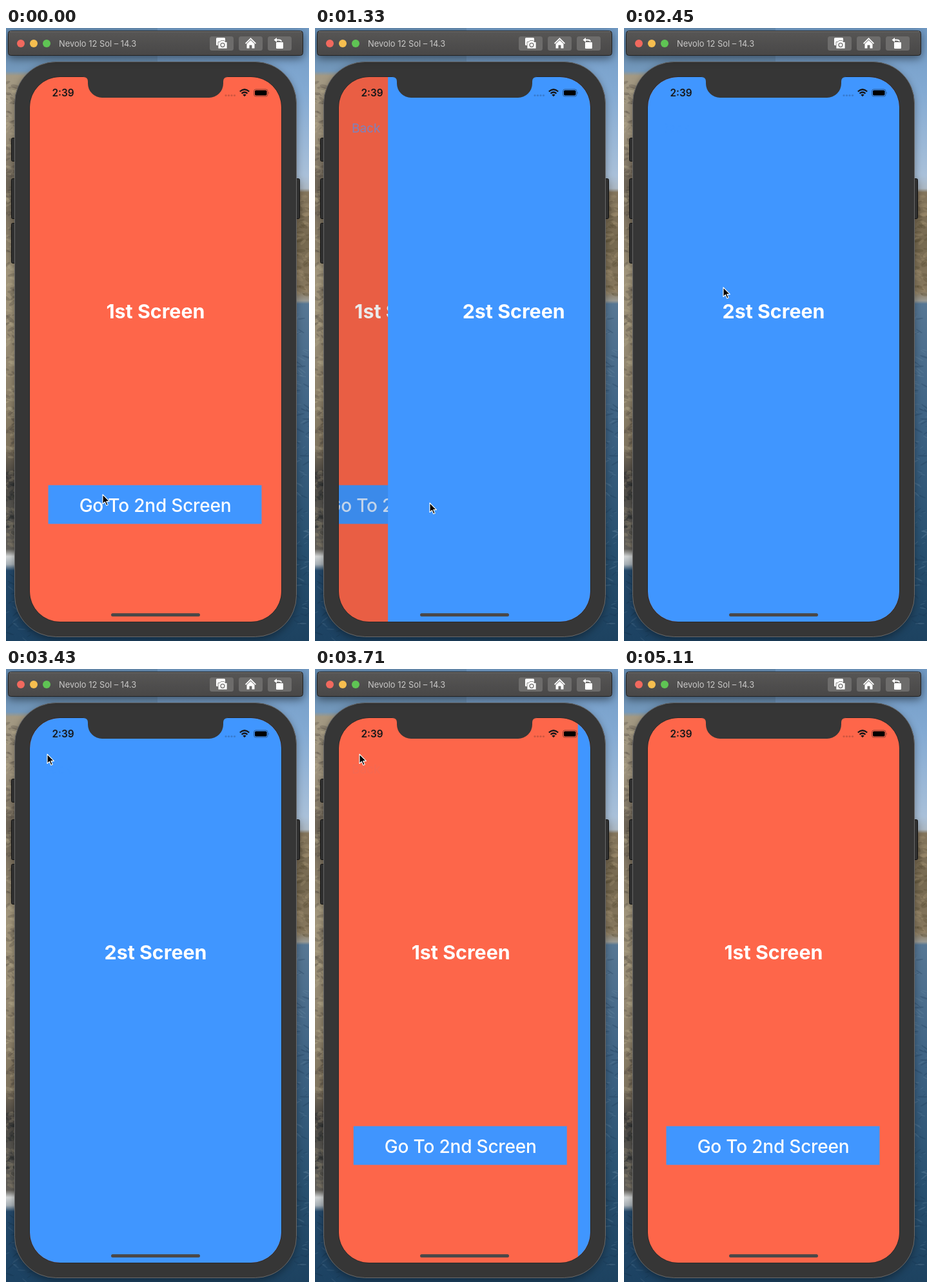
Recreate the animation shown at these times as an HTML page. Size 470 px wide and 950 px high, loop 5.18 s.

```html
<!DOCTYPE html>
<html lang="en">
<head>
<meta charset="utf-8">
<title>Screen navigation</title>
<style>
  html, body { margin: 0; width: 100%; height: 100%; overflow: hidden; background: #1d4260; }
  svg { display: block; width: 100%; height: 100%; }
  text { font-family: Inter, Roboto, sans-serif; font-optical-sizing: none; }
  .heading { font-size: 30.4px; font-weight: 700; fill: #fff; text-anchor: middle; }
  .link { font-size: 28px; font-weight: 450; letter-spacing: -.2px; fill: #fff; text-anchor: middle; }
  .device { filter: drop-shadow(0 4px 6px rgba(0, 0, 0, .35)); }
  .bar { filter: drop-shadow(0 4px 7px rgba(0, 0, 0, .5)); }
</style>
</head>
<body>
<svg viewBox="0 0 470 950" preserveAspectRatio="none">
  <defs>
    <linearGradient id="leftTone" x2="0" y2="1">
      <stop offset="0" stop-color="#688fb5"/>
      <stop offset=".07" stop-color="#7398bb"/>
      <stop offset=".078" stop-color="#a39983"/>
      <stop offset=".2" stop-color="#9c907a"/>
      <stop offset=".25" stop-color="#71685a"/>
      <stop offset=".33" stop-color="#8a7e69"/>
      <stop offset=".4" stop-color="#a2967c"/>
      <stop offset=".55" stop-color="#958971"/>
      <stop offset=".68" stop-color="#81755f"/>
      <stop offset=".73" stop-color="#4c4843"/>
      <stop offset=".78" stop-color="#55534e"/>
      <stop offset=".85" stop-color="#625f59"/>
      <stop offset=".862" stop-color="#d3d6d6"/>
      <stop offset=".875" stop-color="#a9b2b8"/>
      <stop offset=".885" stop-color="#24496a"/>
      <stop offset="1" stop-color="#1c4262"/>
    </linearGradient>
    <linearGradient id="rightTone" x2="0" y2="1">
      <stop offset="0" stop-color="#719ac4"/>
      <stop offset=".1" stop-color="#82a9d2"/>
      <stop offset=".24" stop-color="#a9c0d9"/>
      <stop offset=".262" stop-color="#adb9c4"/>
      <stop offset=".268" stop-color="#85765d"/>
      <stop offset=".35" stop-color="#766950"/>
      <stop offset=".43" stop-color="#88795f"/>
      <stop offset=".445" stop-color="#9a9a93"/>
      <stop offset=".45" stop-color="#577794"/>
      <stop offset=".65" stop-color="#3d6283"/>
      <stop offset=".85" stop-color="#28506f"/>
      <stop offset="1" stop-color="#1d4260"/>
    </linearGradient>
    <linearGradient id="barTone" x2="0" y2="1">
      <stop offset="0" stop-color="#575655"/>
      <stop offset="1" stop-color="#484747"/>
    </linearGradient>
    <clipPath id="display"><rect x="37" y="76" width="390" height="844" rx="47"/></clipPath>
  </defs>

  <rect width="235" height="950" fill="url(#leftTone)"/>
  <rect x="235" width="235" height="950" fill="url(#rightTone)"/>
  <g id="texture"></g>

  <g class="device">
    <g fill="#303030" stroke="#111">
      <rect x="8.5" y="170.5" width="9" height="36" rx="2"/>
      <rect x="8.5" y="233.5" width="9" height="62" rx="2"/>
      <rect x="8.5" y="302.5" width="9" height="62" rx="2"/>
      <rect x="446.5" y="233.5" width="9" height="62" rx="2"/>
    </g>
    <rect x="13.5" y="52.5" width="437" height="891" rx="64" fill="#363636" stroke="#686868"/>
  </g>

  <g clip-path="url(#display)">
    <rect x="37" y="76" width="390" height="844" fill="#fe664a"/>
    <g id="first">
      <rect x="37" y="76" width="390" height="844" fill="#fe664a"/>
      <text class="heading" x="232" y="450">1st Screen</text>
      <rect x="65.5" y="708.5" width="331" height="60" fill="#4096ff"/>
      <text id="link" class="link" x="231.5" y="750">Go To 2nd Screen</text>
      <rect id="dim" x="37" y="76" width="390" height="844" fill="#000"/>
    </g>
    <g id="second">
      <rect x="37" y="76" width="390" height="844" fill="#4096ff"/>
      <text class="heading" x="232" y="450">2st Screen</text>
    </g>
    <text id="back" x="57" y="162" font-size="19" fill="#4096ff">Back</text>

    <g fill="#171719">
      <text x="71.5" y="106" font-size="15.4" font-weight="600">2:39</text>
      <g opacity=".2">
        <circle cx="341" cy="104.5" r="1.6"/><circle cx="345.5" cy="104.5" r="1.6"/>
        <circle cx="350" cy="104.5" r="1.6"/><circle cx="354.5" cy="104.5" r="1.6"/>
      </g>
      <g fill="none" stroke="#171719" stroke-width="2.3">
        <path d="M362.8 98.5Q370 92 377.2 98.5M365.5 101.5Q370 97.5 374.5 101.5"/>
      </g>
      <path d="M367.3 103.5Q370 101.3 372.7 103.5L370 106.2Z"/>
      <rect x="384.5" y="95" width="21.5" height="11" rx="3" fill="none" stroke="#171719" opacity=".45"/>
      <rect x="386" y="96.5" width="18.5" height="8" rx="1.7" fill="#000"/>
      <path d="M407.2 98.7q1.8 1.8 0 3.6Z" opacity=".5"/>
    </g>
    <rect x="163" y="907" width="138" height="5" rx="2.5" fill="#4b4848"/>
  </g>
  <rect x="36.5" y="75.5" width="391" height="845" rx="47.5" fill="none" stroke="#222" stroke-opacity=".65"/>
  <path d="M120 74V76Q127 76 127 83V86a22 22 0 0 0 22 22H315a22 22 0 0 0 22-22V83Q337 76 344 76V74Z" fill="#363636"/>

  <g class="bar">
    <rect x="3.5" y="4.5" width="457" height="38" rx="4" fill="url(#barTone)" stroke="#222"/>
    <path d="M6 5.5H458" stroke="#757473"/>
  </g>
  <circle cx="23" cy="24" r="6" fill="#f1695e"/>
  <circle cx="43" cy="24" r="6" fill="#f6be4f"/>
  <circle cx="63" cy="24" r="6" fill="#5fc454"/>
  <text x="82" y="28.7" font-size="12.9" fill="#c9c8c7">Nevolo 12 Sol – 14.3</text>
  <g fill="#6d6c6b">
    <rect x="316" y="13" width="37" height="22" rx="3.5"/>
    <rect x="361" y="13" width="37" height="22" rx="3.5"/>
    <rect x="406" y="13" width="37" height="22" rx="3.5"/>
  </g>
  <g fill="#fff">
    <rect x="326" y="15" width="14" height="12" rx="1.5"/>
    <path d="M329 21.5h3l1.5-2h5l1.5 2h3V32H329Z" stroke="#6d6c6b" stroke-width=".8"/>
    <circle cx="336" cy="26.3" r="3" fill="none" stroke="#6d6c6b" stroke-width="1.2"/>
    <path d="M379.5 15L388 23.5 386.8 24.7 379.5 17.5 372.2 24.7 371 23.5ZM373.5 24.5L379.5 18.8 385.5 24.5V31.5H381.5V26.5H377.5V31.5H373.5Z"/>
    <rect x="419" y="22" width="11" height="10" rx="1.2"/>
    <path d="M420 15L415.5 18.5 420 22Z"/>
    <path d="M419 18.5H423Q427 18.5 427 21" fill="none" stroke="#fff" stroke-width="1.8"/>
  </g>

  <path id="cursor" d="M0 0V14.5L3.4 11.4 5.8 17 8.2 16 5.8 10.6H10.4Z" stroke="#fff" stroke-width="1.1" stroke-linejoin="round"/>
</svg>
<script>
const LOOP = 5180, STEP = 70, WIDTH = 390;
const PUSH = 1152, POP = 3430, SPRING = .017;
const el = id => document.getElementById(id);
const [first, second, dim, link, back, cursor] =
  ['first', 'second', 'dim', 'link', 'back', 'cursor'].map(el);

// Rocks and ripples in the visible strips of the backdrop
let seed = 7;
const random = () => (seed = seed * 16807 % 2147483647) / 2147483647;
function scatter(count, x, width, y, height, rx, ry, tones, opacity) {
  let shapes = '';
  for (let i = 0; i < count; i++) {
    const cx = x + random() * width, cy = y + random() * height;
    const tone = tones[i % tones.length], size = .4 + 1.2 * random();
    shapes += `<ellipse cx="${cx}" cy="${cy}" rx="${rx * size}" ry="${ry * size}" fill="${tone}"
      opacity="${opacity}" transform="rotate(${random() * 90 - 45} ${cx} ${cy})"/>`;
  }
  el('texture').innerHTML += shapes;
}
scatter(220, 0, 16, 84, 590, 5, 1.8, ['#4e493f', '#c0b395'], .28);
scatter(60, 0, 16, 685, 120, 4, 2, ['#22272b', '#8d8370'], .35);
scatter(70, 450, 20, 260, 155, 5, 2, ['#51492f', '#aa9775'], .28);
scatter(110, 448, 22, 432, 510, 5, .8, ['#16354f', '#7392ab'], .25);
scatter(40, 0, 50, 845, 105, 5, .8, ['#102a40', '#557590'], .25);

const smooth = u => u * u * (3 - 2 * u);
function track(t, keys) {
  const next = keys.findIndex(key => key[0] > t);
  if (next < 0) return keys[keys.length - 1].slice(1);
  if (!next) return keys[0].slice(1);
  const [from, to] = [keys[next - 1], keys[next]];
  const u = smooth((t - from[0]) / (to[0] - from[0]));
  return from.slice(1).map((value, i) => value + (to[i + 1] - value) * u);
}

// Critically damped spring from 0 to 1
function spring(elapsed) {
  const x = Math.max(0, elapsed) * SPRING;
  return x > 9 ? 1 : 1 - (1 + x) * Math.exp(-x);
}

const cursorPath = [
  [0, 150, 723], [800, 176, 736], [1120, 176, 736], [1330, 178, 736], [1750, 178, 736],
  [2450, 154, 402], [3150, 64, 132], [3430, 64, 132], [3710, 69, 132],
  [4000, 69, 132], [4600, 130, -22]
];
const linkFade = [[900, 1], [1050, .18], [1180, .18], [1410, 1]];
const move = (node, x, y = 0) => node.setAttribute('transform', `translate(${x} ${y})`);

function draw(now) {
  const t = Math.floor(now % LOOP / STEP) * STEP;
  const shown = t < POP ? spring(t - PUSH) : 1 - spring(t - POP);
  move(first, -.3 * WIDTH * shown);
  move(second, WIDTH * (1 - shown));
  dim.setAttribute('opacity', .1 * shown);
  back.setAttribute('opacity', .8 * shown);
  link.setAttribute('opacity', track(t, linkFade)[0]);
  move(cursor, ...track(t, cursorPath));
}

const start = performance.now();
function tick() {
  draw(performance.now() - start);
  requestAnimationFrame(tick);
}
tick();
</script>
</body>
</html>
```
